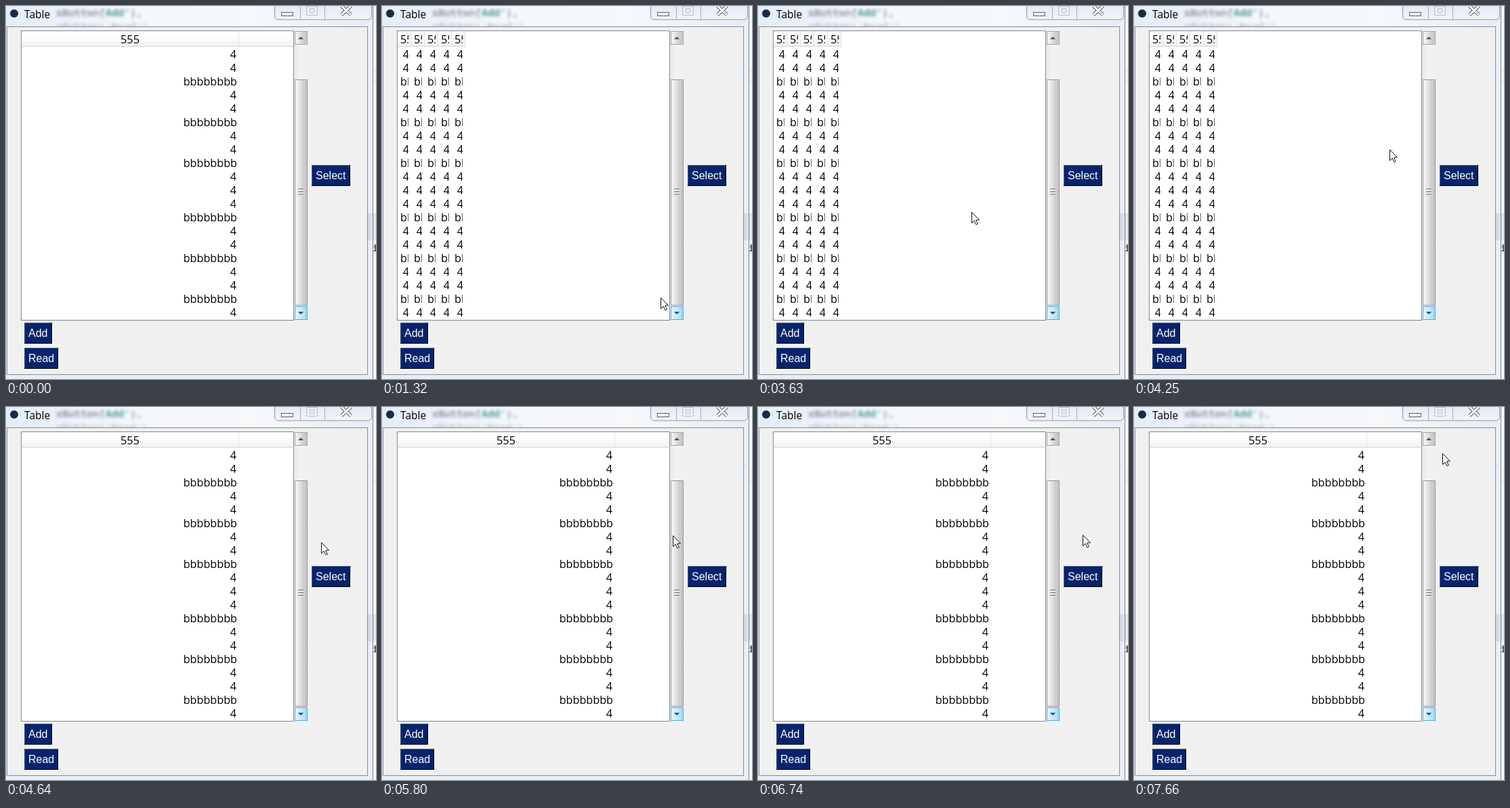
Write an HTML page with a canvas that moves like this. It is 546 by 549 pixels and loops after 8 s.

```html
<!DOCTYPE html>
<html lang="en">
<head>
<meta charset="utf-8">
<title>Table</title>
<style>
html, body { margin: 0; width: 546px; height: 549px; overflow: hidden; }
canvas { display: block; }
</style>
</head>
<body>
<canvas id="stage" width="546" height="549"></canvas>
<script>
const ctx = document.getElementById("stage").getContext("2d", { alpha: false });
const LOOP = 8000, STEP = 77;
const UI = "16.2px 'Open Sans', sans-serif";
const CODE = "bold 15px 'Noto Sans Mono', monospace";
const ROWS = "44b44b44b444b44b44b4";

// Pointer legs: first and last step in ms, then where the tip arrives
const ENTRY = [449, 553];
const legs = [
  [700, 1000, 421, 446], [1170, 1320, 411, 429], [1400, 2010, 405, 417],
  [3170, 3630, 315, 303], [3707, 3940, 306, 220], [4020, 4640, 465, 199],
  [5040, 5190, 466, 191], [5420, 5800, 429, 189], [5877, 6110, 402, 189],
  [6510, 6740, 479, 188], [6816, 7270, 483, 90], [7350, 7660, 455, 68]
];

// The pointer jumps along each leg in equal steps and rests between legs
function pointerAt(t) {
  let [x, y] = ENTRY;
  for (const [start, end, toX, toY] of legs) {
    if (t < start) break;
    const steps = Math.round((end - start) / STEP) + 1;
    const k = Math.min(1, Math.floor((t - start) / STEP + 1.1) / steps);
    x += (toX - x) * k;
    y += (toY - y) * k;
  }
  return [Math.round(x), Math.round(y)];
}

function fill(x, y, w, h, color) {
  ctx.fillStyle = color;
  ctx.fillRect(x, y, w, h);
}

function frame(x, y, w, h, color) {
  ctx.strokeStyle = color;
  ctx.lineWidth = 1;
  ctx.strokeRect(x + 0.5, y + 0.5, w - 1, h - 1);
}

function gradient(x0, y0, x1, y1, ...colors) {
  const g = ctx.createLinearGradient(x0, y0, x1, y1);
  colors.forEach((c, i) => g.addColorStop(i / (colors.length - 1), c));
  return g;
}

function text(str, x, y, { color = "#000", align = "left", font = UI } = {}) {
  ctx.font = font;
  ctx.textAlign = align;
  ctx.fillStyle = color;
  ctx.fillText(str, x, y);
}

function clipped(x, y, w, h, paint) {
  ctx.save();
  ctx.beginPath();
  ctx.rect(x, y, w, h);
  ctx.clip();
  paint();
  ctx.restore();
}

function pushButton(label, x, y, w) {
  fill(x, y, w, 31, "#000");
  fill(x, y, w - 1, 30, "#4a5f92");
  fill(x + 1, y + 1, w - 2, 29, "#05246a");
  text(label, x + 6, y + 21, { color: "#fff", font: "16px 'Liberation Sans', Arial, sans-serif" });
}

function drawWindow() {
  fill(0, 0, 546, 549, "#e6eef8");
  fill(0, 0, 541, 30, gradient(0, 0, 541, 0, "#e2edfa", "#f4f7fb", "#f6f8fb", "#e6edf6"));
  ctx.filter = "blur(2px)";
  text("xButton(", 74, 15, { color: "#8f959b", font: CODE });
  text("'Add'", 138, 15, { color: "#4d9a9d", font: CODE });
  text("),", 183, 15, { color: "#8f959b", font: CODE });
  text("xButton('Read')", 74, 35, { color: "#bcc3ca", font: CODE });
  ctx.filter = "none";

  // Strip of the desktop beside the window
  fill(541, 0, 5, 549, "#fbfbfb");
  fill(541, 92, 5, 22, "#fbf3df");
  fill(534, 305, 12, 40, gradient(534, 0, 546, 0, "#ced8e3", "#e9e9e9"));
  clipped(541, 340, 5, 25, () => text("d", 539, 361, { font: "15px 'Liberation Serif', serif" }));
  fill(541, 0, 1, 549, "#7a8490");

  ctx.beginPath();
  ctx.arc(12, 11, 6, 0, 7);
  ctx.fillStyle = "#1b2a45";
  ctx.fill();
  text("Table", 27, 18, { font: "15.6px 'Open Sans', sans-serif" });

  fill(2, 31, 531, 511, "#f0f0f0");
  frame(1, 30, 533, 513, "#858c95");
}

function drawCaptionButtons() {
  ctx.beginPath();
  ctx.roundRect(396.5, -6, 143, 26, 5);
  ctx.fillStyle = gradient(0, 0, 0, 20, "#e5ebf2", "#f2f5f9");
  ctx.fill();
  ctx.strokeStyle = "#8994a2";
  ctx.stroke();
  for (const x of [434, 470]) fill(x, 0, 1, 19, "#a4adb8");
  fill(406, 9, 18, 6, "#555c66");
  fill(407, 10, 16, 4, "#fff");
  frame(443, 0, 17, 14, "#b8c0ca");
  frame(448, 4, 7, 6, "#b8c0ca");
  const cross = new Path2D("M495 0l14 13m0-13l-14 13");
  for (const [color, width] of [["#555c66", 5], ["#fff", 3]]) {
    ctx.strokeStyle = color;
    ctx.lineWidth = width;
    ctx.stroke(cross);
  }
}

function scrollPart(y, h, edge, ...shades) {
  fill(426, y, 19, h, gradient(426, 0, 445, 0, ...shades));
  frame(426, y, 19, h, edge);
}

function arrow(y, direction, color) {
  ctx.fillStyle = color;
  ctx.fill(new Path2D(`M431 ${y}h8l-4 ${4 * direction}z`));
}

function drawScrollbar() {
  const silver = ["#f5f5f5", "#e8e8e9", "#cfcfd1", "#c2c3c6"];
  fill(426, 37, 19, 426, gradient(426, 0, 445, 0, "#e9e9e9", "#f3f3f3", "#f0f0f0"));
  scrollPart(37, 20, "#a5a5a5", ...silver);
  scrollPart(108, 333, "#979797", ...silver);
  scrollPart(442, 20, "#5aa9d3", "#e5f5fd", "#c7e9fb", "#9ad4f3");
  arrow(49, -1, "#555");
  arrow(450, 1, "#1c5478");
  for (let y = 269; y < 280; y += 4) {
    fill(431, y, 8, 1, "#666");
    fill(431, y + 1, 8, 1, "#fff");
  }
}

function drawTable(narrow) {
  const columns = narrow ? 5 : 1, width = narrow ? 20 : 320;
  const headerWidth = narrow ? 100 : 401;
  fill(22, 36, 403, 427, "#fff");
  fill(23, 37, headerWidth, 22, gradient(0, 37, 0, 59, "#fff", "#fff", "#f7f8fa", "#f1f2f4"));
  fill(23, 59, headerWidth, 1, "#d5d5d5");
  for (let c = 0; c < columns; c++) {
    const left = 23 + c * width, right = left + width;
    fill(narrow ? right - 1 : right, 37, 1, 22, "#dfe1e4");
    clipped(left + 4, 37, width - (narrow ? 8 : 4), 425, () => {
      text("555", narrow ? left + 4 : left + width / 2, 55, { align: narrow ? "left" : "center" });
      [...ROWS].forEach((cell, i) => {
        const y = 77 + i * 20;
        if (cell === "4") text("4", right - 3, y, { align: "right" });
        else if (narrow) text("bbbbbbbb", left + 4, y);
        else text("bbbbbbbb", right - 2, y, { align: "right" });
      });
    });
  }
  frame(22, 36, 403, 427, "#828790");
}

function drawPointer(x, y) {
  ctx.save();
  ctx.translate(x + 0.5, y + 0.5);
  const outline = new Path2D("M0 0V16L3.7 12.5L6.4 18.3L8.8 17.2L6.2 11.5L11 11.3Z");
  ctx.fillStyle = "#fff";
  ctx.fill(outline);
  ctx.strokeStyle = "#111";
  ctx.lineWidth = 1;
  ctx.stroke(outline);
  ctx.restore();
}

function draw(t) {
  const [x, y] = pointerAt(t);
  drawWindow();
  drawCaptionButtons();
  // Columns shrink while the pointer is over the table
  drawTable(x > 22 && x < 425 && y > 36 && y < 462);
  drawScrollbar();
  pushButton("Add", 27, 466, 41);
  pushButton("Read", 27, 503, 50);
  pushButton("Select", 451, 234, 57);
  drawPointer(x, y);
}

function tick() {
  draw(performance.now() % LOOP);
  requestAnimationFrame(tick);
}
tick();
</script>
</body>
</html>
```
